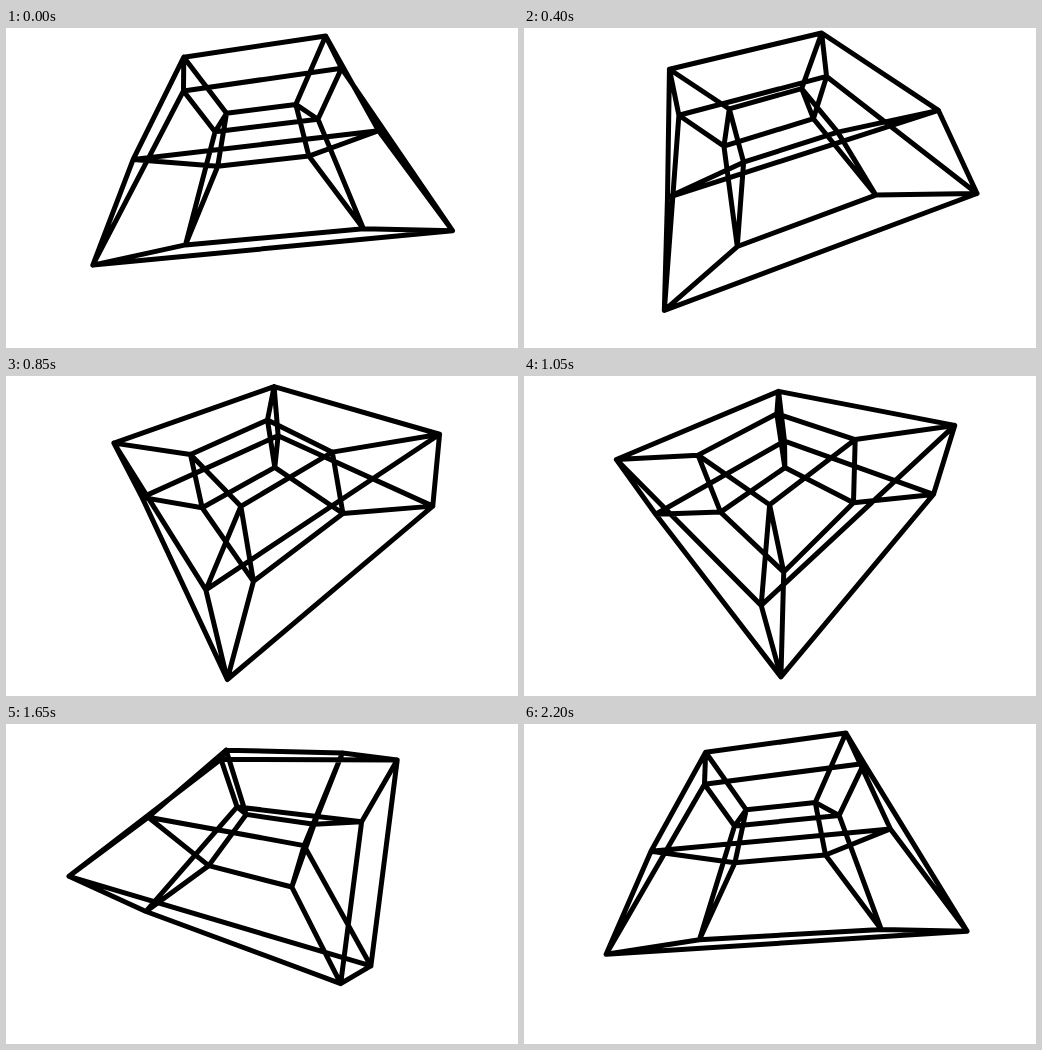
An HTML page for the animation above (2.25 s loop, 512 by 320 pixels).

```html
<!DOCTYPE html>
<html lang="en">
<head>
<meta charset="utf-8">
<title>Turning wireframe</title>
<style>
  html, body { margin: 0; width: 100%; height: 100%; overflow: hidden; background: #fff; }
  svg { display: block; width: 512px; height: 320px; }
  path { fill: none; stroke: #000; stroke-width: 5; stroke-linecap: round; stroke-linejoin: round; }
</style>
</head>
<body>
<svg viewBox="0 0 512 320"><path id="wire"/></svg>
<script>
const LOOP = 2250, STEP = 50;
const UNIT = 56.7, DEPTH = 0.2534;
const CENTER = { x: 255.6, y: 103.5 };
const rad = degrees => degrees * Math.PI / 180;
const TILT = rad(40), ROLL = rad(10.1), START = rad(50.1);
const { sin, cos, exp, PI } = Math;
const wire = document.getElementById('wire');

// Tilt and roll a point, then scale it exponentially with its depth.
function project(across, front, up) {
  const y = front * sin(TILT) - up * cos(TILT);
  const z = front * cos(TILT) + up * sin(TILT);
  const scale = UNIT * exp(DEPTH * z);
  const px = CENTER.x + scale * (across * cos(ROLL) + y * sin(ROLL));
  const py = CENTER.y + scale * (y * cos(ROLL) - across * sin(ROLL));
  return px.toFixed(2) + ' ' + py.toFixed(2);
}

// Corner of a four-sided ring: i counts around the axis, j around the tube.
function corner(i, j, turn) {
  const around = START + i * PI / 2 - turn;
  const tube = j * PI / 2 + turn;
  const radius = 2 + sin(tube);
  return project(radius * cos(around), radius * sin(around), cos(tube));
}

function draw(time) {
  const step = Math.floor((time % LOOP) / STEP);
  const turn = step * STEP / LOOP * PI / 2;
  let d = '';
  for (let i = 0; i < 4; i++) {
    for (let j = 0; j < 4; j++) {
      d += `M${corner(i + 1, j, turn)}L${corner(i, j, turn)}L${corner(i, j + 1, turn)}`;
    }
  }
  wire.setAttribute('d', d);
}

const begin = performance.now();
function tick() {
  draw(performance.now() - begin);
  requestAnimationFrame(tick);
}
tick();
</script>
</body>
</html>
```
